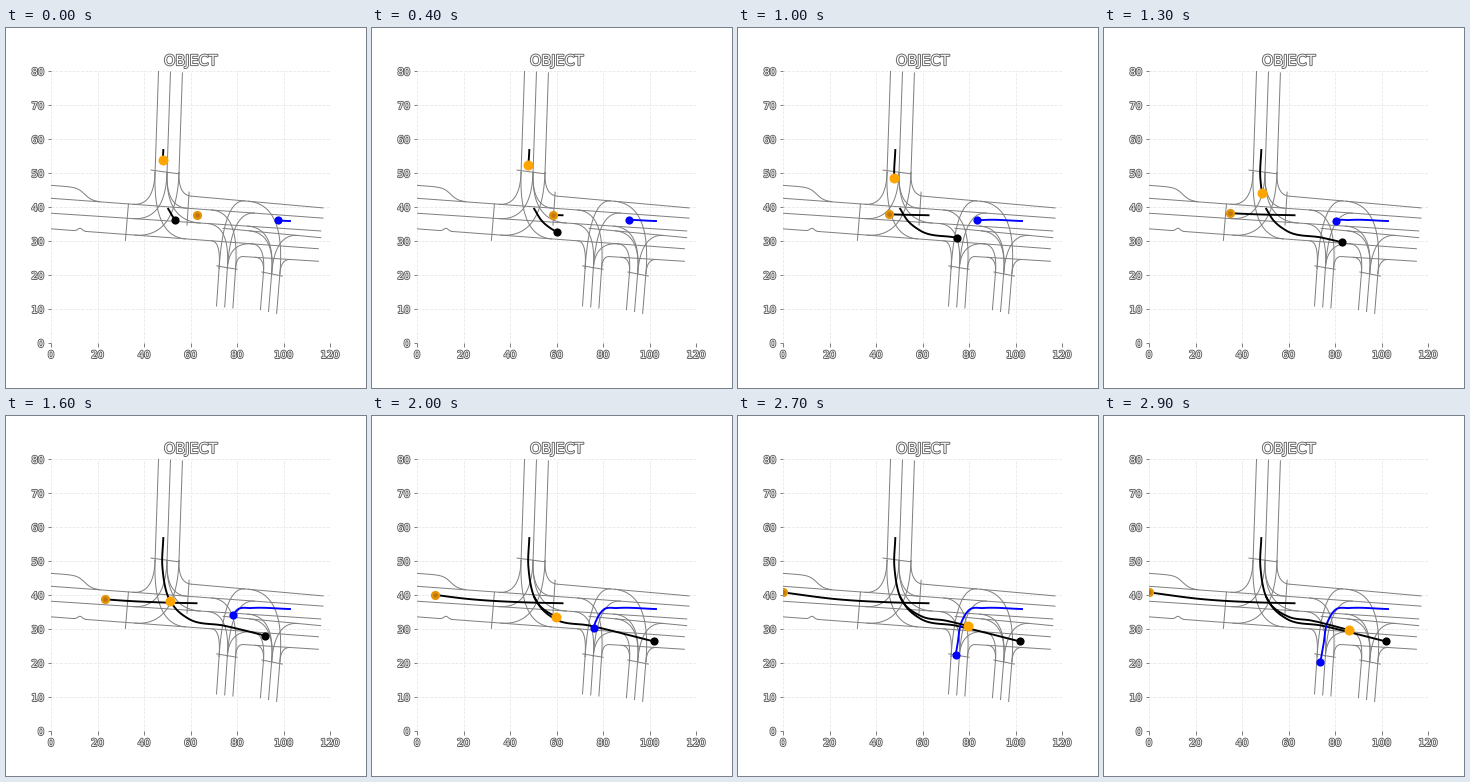
Recreate the animation shown at these times as a matplotlib script. Size 360 px wide and 360 px high, loop 3 s.

```python
import numpy as np
import matplotlib.pyplot as plt
from matplotlib.animation import FuncAnimation
from matplotlib.patheffects import withStroke

FRAMES, INTERVAL = 30, 100
GREY = "#606060"

plt.rcParams["font.family"] = "DejaVu Sans"

fig = plt.figure(figsize=(5, 5), dpi=72, facecolor="white")
fig.subplots_adjust(left=0.125, right=0.9, bottom=0.125, top=0.88)
ax = fig.add_subplot()
ax.set(xlim=(0, 120), ylim=(0, 80))
ax.set_xticks(range(0, 121, 20))
ax.set_yticks(range(0, 81, 10))
ax.tick_params(color=GREY, labelsize=10)
ax.grid(color="#e8e8e8", linestyle="--", linewidth=0.8)
ax.set_axisbelow(True)
ax.spines[:].set_visible(False)

# Lettering is a grey outline around a white core
title = ax.set_title("OBJECT", fontsize=14.4)
for text in [title, *ax.get_xticklabels(), *ax.get_yticklabels()]:
    text.set(color="white",
             path_effects=[withStroke(linewidth=1.8, foreground=GREY)])


def road(x, y):
    ax.plot(x, y, color="gray", lw=1, zorder=1.5)


class Across:
    """Line running east: y = c - fall * x."""

    def __init__(self, c, fall, start, end):
        self.c, self.fall = c, fall
        ends = np.array([start, end])
        road(ends, self.y(ends))

    def y(self, x):
        return self.c - self.fall * x


class Upright:
    """Line running north: x = c + lean * y, with turns starting at stop."""

    def __init__(self, c, lean, stop, end):
        self.c, self.lean, self.stop = c, lean, stop
        ends = np.array([stop, end])
        road(self.x(ends), ends)

    def x(self, y):
        return self.c + self.lean * y

    def turn(self, lane, reach):
        """Bend onto a lane, joining it `reach` metres past the corner."""
        y = (lane.c - lane.fall * self.c) / (1 + lane.fall * self.lean)
        x = self.x(y)
        start = (self.x(self.stop), self.stop)
        end = (x + reach, lane.y(x + reach))
        u = np.linspace(0, 1, 30)[:, None]
        curve = ((1 - u) ** 2 * np.array(start)
                 + 2 * u * (1 - u) * np.array((x, y)) + u * u * np.array(end))
        road(*curve.T)


# East-west lanes, north to south
upper = Across(46.9, 0.061, 60.5, 117)
west = Across(42.6, 0.05, 0, 117)
mid = Across(38.2, 0.045, 0, 116)
island = Across(38.6, 0.0655, 74, 116)
east = Across(33.6, 0.051, 15, 115)
kerb = Across(29, 0.043, 83, 115)

# Lay-by and kerb bump at the west end
x = np.linspace(0, 21, 60)
road(x, west.y(x) + 3.8 / (1 + np.exp((x - 14.5) / 1.6)))
x = np.linspace(0, 15, 60)
road(x, east.y(x) + 0.8 * np.exp(-((x - 12.5) / 1.3) ** 2))

# Side roads: left, centre and right line of each
north = [Upright(42.25 + 5.15 * i, 0.05, 50.2, 80 - i / 4) for i in range(3)]
south = [Upright(70.1 + 3.55 * i, 0.1, 22, 10.9 - 0.3 * i) for i in range(3)]
far = [Upright(88.9 + 3.55 * i, 0.12, 20.5, 9.8 - 0.55 * i) for i in range(3)]

# Stop lines
road((43, 55), (50.9, 49.8))
road((33.3, 32), (40.9, 30.2))
road((59.4, 58.5), (44.4, 34.7))
road((71.3, 80), (22.7, 21.7))
road((90.7, 99.5), (20.9, 19.7))

left, centre, right = north
right.turn(upper, 5.6)
right.turn(east, -18)
centre.turn(west, 9)
centre.turn(mid, 15)
centre.turn(mid, -14)
left.turn(west, -9)
left.turn(east, 14)

left, centre, right = south
left.turn(east, -4)
left.turn(upper, 9)
centre.turn(mid, -10)
centre.turn(west, 10)
centre.turn(east, 10)
right.turn(west, -12)
right.turn(kerb, 3)

left, centre, right = far
left.turn(kerb, -4)
left.turn(east, -6)
centre.turn(island, -11)
centre.turn(mid, -12)
centre.turn(island, 10)
right.turn(upper, -16)
right.turn(kerb, 4)


def spline(t, knots, pts):
    """Cubic Hermite curve through pts, clamped at both ends."""
    knots, pts = np.asarray(knots, float), np.asarray(pts, float)
    t = np.clip(np.asarray(t, float), knots[0], knots[-1])
    slope = np.gradient(pts, knots, axis=0)
    i = np.clip(np.searchsorted(knots, t, side="right") - 1, 0, len(knots) - 2)
    h = (knots[i + 1] - knots[i])[:, None]
    s = (t - knots[i])[:, None] / h
    return ((1 + 2 * s) * (1 - s) ** 2 * pts[i]
            + s * (1 - s) ** 2 * h * slope[i]
            + s * s * (3 - 2 * s) * pts[i + 1]
            + s * s * (s - 1) * h * slope[i + 1])


class Agent:
    """A dot following a route; travel(step) is the distance covered."""

    def __init__(self, color, trail, size, travel, route, core=None):
        self.travel, self.route = travel, np.array(route, float)
        hops = np.hypot(*np.diff(self.route, axis=0).T)
        self.dist = np.r_[0, np.cumsum(hops)]
        self.trail, = ax.plot([], [], color=trail, lw=1.9, zorder=3)
        self.dots = [self.dot(color, size)]
        if core:
            self.dots.append(self.dot(core, size * 0.5))

    @staticmethod
    def dot(color, size):
        return ax.plot([], [], "o", color=color, ms=size, mew=0, zorder=4)[0]

    def move(self, step):
        path = spline(np.linspace(0, self.travel(step), 120),
                      self.dist, self.route)
        self.trail.set_data(path[:, 0], path[:, 1])
        for dot in self.dots:
            dot.set_data(path[-1:, 0], path[-1:, 1])
        return [self.trail, *self.dots]


def paced(*keys):
    """Travel eased through a few (step, distance) keys."""
    steps, dist = zip(*keys)
    return lambda step: spline([step], steps, np.c_[list(dist)])[0, 0]


agents = [
    # steady acceleration until the route ends
    Agent("black", "black", 8.2,
          lambda t: 4.46 + 1.78 * t + 0.0446 * t * t,
          [(50.4, 39.5), (53.4, 36.2), (59, 33.1), (74.4, 31), (102, 26.35)]),
    # brakes for the turn
    Agent("blue", "blue", 8.2,
          lambda t: np.interp(t, [0, 7, 16, 29], [5, 16.6, 25.2, 39.9]),
          [(102.8, 35.9), (86.2, 36.2), (80.4, 35.8), (76.8, 32.1),
           (75.05, 25.5), (73.7, 20.2)]),
    # pulls away and stops at the edge of the plot
    Agent("#e39408", "black", 9.2,
          paced((0, 0), (7, 8.8), (10, 17), (16, 39.6), (22, 62.7)),
          [(62.6, 37.6), (45, 37.9), (23, 38.8), (0, 40.8)], core="#bd770c"),
    # slows at the stop line, then speeds up
    Agent("orange", "black", 10,
          paced((0, 3), (7, 5.9), (10, 8.2), (20, 28.8), (24, 39), (29, 55.5)),
          [(48.3, 56.8), (47.9, 48.4), (51.4, 38.1), (59.8, 33.7),
           (69.9, 32.5), (86.2, 29.7)]),
]


def draw(step):
    return [artist for agent in agents for artist in agent.move(step)]


anim = FuncAnimation(fig, draw, frames=FRAMES, interval=INTERVAL,
                     repeat=True, repeat_delay=0)
plt.show()
```
